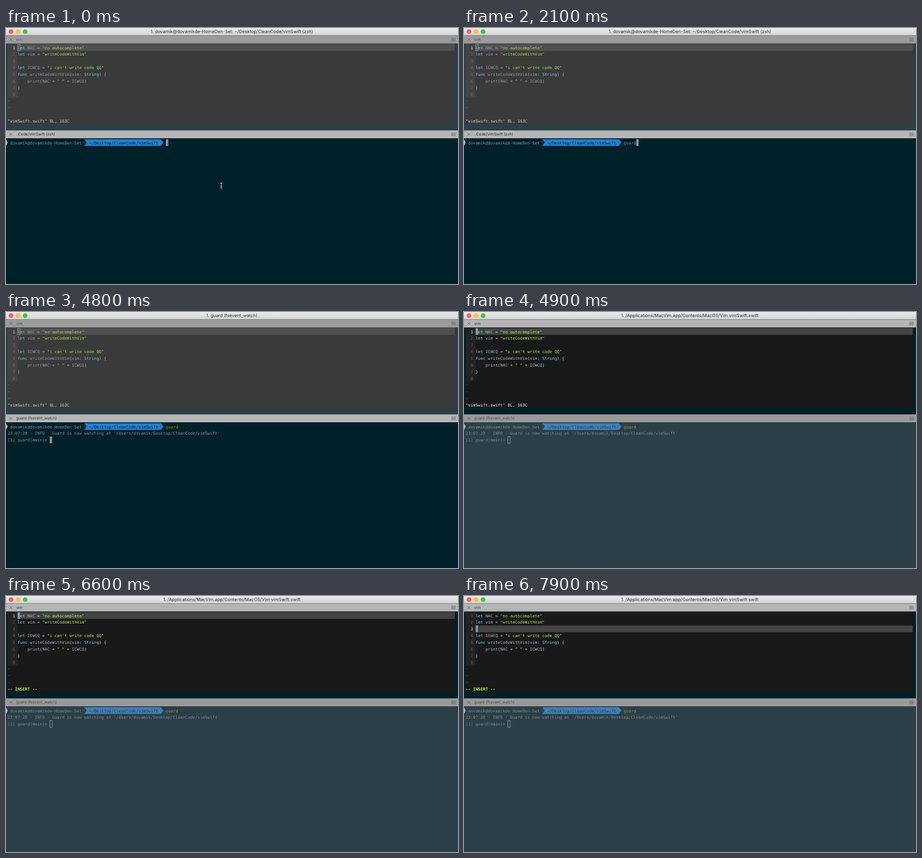
An HTML page that plays this animation: 800x455 px, repeating every 8000 ms.

```html
<!DOCTYPE html>
<html lang="en">
<head>
<meta charset="utf-8">
<title>Terminal session</title>
<style>
  html, body { margin: 0; width: 100%; height: 100%; overflow: hidden; background: #00202a; }
  svg {
    display: block; width: 800px; height: 455px;
    --shell: #00202a; --shellText: #7f9093; --guard: #859900; --blue: #2080d0; --path: #03263a; --tip: #86c9f0;
    --frame: #2c3f47; --vim: #3a3a3a; --gutter: #434343; --line: #505050; --num: #6c6c6c; --now: #d4d4d4;
    --key: #7cc4d8; --name: #9497a8; --str: #a9d85c; --plain: #b4b6b6; --tilde: #68777c; --status: #d0d0d0;
    --vimTab: #9b9b9b; --shellTab: #b5b5b5; --vimLabel: #4c4c4c; --shellLabel: #303030;
  }
  svg.editing {
    --shell: #2c3f47; --shellText: #7c8b8f; --guard: #93973a; --blue: #3f80b3; --path: #1f3f56; --tip: #8fc4e2;
    --frame: #00202a; --vim: #191919; --gutter: #232323; --line: #434343; --num: #606060; --now: #ececec;
    --key: #72dbf2; --name: #aab2c6; --str: #b2f24e; --plain: #d6d8d8; --tilde: #4d6168; --status: #f2f2f2;
    --vimTab: #b5b5b5; --shellTab: #999999; --vimLabel: #303030; --shellLabel: #4c4c4c;
  }
  text { white-space: pre; text-rendering: geometricPrecision; }
  .mono { font: 7.262px "DejaVu Sans Mono", monospace; font-variant-ligatures: none; }
  .title { font: 7.9px Inter, sans-serif; fill: #2f2f2f; text-anchor: middle; }
  .tab { font: 6.8px Inter, sans-serif; }
  .key { fill: var(--key); } .name { fill: var(--name); } .str { fill: var(--str); }
  .plain { fill: var(--plain); } .num { fill: var(--num); } .now { fill: var(--now); }
  .tilde { fill: var(--tilde); } .status { fill: var(--status); }
  .insert { fill: #b2f24e; font-weight: bold; }
  .out { fill: var(--shellText); } .path { fill: var(--path); } .guard { fill: var(--guard); }
</style>
</head>
<body>
<svg id="stage" viewBox="0 0 800 455" xmlns="http://www.w3.org/2000/svg"></svg>
<script>
const LOOP = 8000;
const COL = 4.372, ROW = 11.86, LEFT = 3;
const VIM_TOP = 28.8, SHELL_TOP = 197.7;
const USER = 'dovamik', HOST = USER + 'de-HomeDen-Set', DIR = '~/Desktop/CleanCode/vimSwift';

// When each thing happens, in ms
const KEYS = [800, 1200, 1400, 1600, 1900];
const ENTER = 2300, WATCHING = 3200, READY = 3300, EVENTS = 4100, FOCUS = 4900;
const INSERT = 6500, DOWN = [7500, 7700];

const CODE = [
  'key:let|name: NAC|plain: = |str:"no autocomplete"',
  'key:let|name: vim|plain: = |str:"writeCodeWithVim"',
  '',
  'key:let|name: ICWCQ|plain: = |str:"i can\'t write code QQ"',
  'key:func|name: writeCodeWithVim|plain:(|name:vim|plain:: |key:String|plain:) {',
  'name:    print|plain:(|name:NAC|plain: + |str:" "|plain: + |name:ICWCQ|plain:)',
  'plain:}',
  ''
];

const svg = document.getElementById('stage');
const x = col => LEFT + col * COL;
const vimY = row => VIM_TOP + row * ROW;
const shellY = row => SHELL_TOP + row * ROW;
const passed = (times, t) => times.filter(at => t >= at).length;

const rect = (left, top, w, h, fill, extra = '') =>
  `<rect x="${left}" y="${top}" width="${w}" height="${h}" style="fill:${fill}" ${extra}/>`;
const mono = (col, top, cls, body) =>
  `<text class="mono ${cls}" x="${x(col)}" y="${top + 8.8}">${body}</text>`;
const spans = line => line.split('|').map(part => {
  const cut = part.indexOf(':');
  return `<tspan class="${part.slice(0, cut)}">${part.slice(cut + 1)}</tspan>`;
}).join('');
const arrow = (left, fill) =>
  `<path d="M${left} ${SHELL_TOP}l${COL} ${ROW / 2}l${-COL} ${ROW / 2}z" style="fill:${fill}"/>`;

function cursor(col, top, filled) {
  const w = COL - 0.2, h = ROW - 0.2;
  return filled
    ? rect(x(col), top, COL, ROW, '#8b9293')
    : rect(x(col) + 0.3, top + 0.2, w, h, 'none', 'stroke="#9aa3a5" stroke-width=".8"');
}

function tabBar(top, name, label) {
  const mid = top + 7;
  const bars = [-2.2, 0, 2.2].map(d => `M788 ${mid + d}h8`).join('');
  return rect(0, top, 800, 14, `var(--${name}Tab)`) +
    `<path d="M6 ${mid - 2.4}l5 5m0 -5l-5 5${bars}" fill="none" stroke="#585858" stroke-width=".8"/>` +
    `<text class="tab" x="18" y="${mid + 2.4}" style="fill:var(--${name}Label)">${label}</text>`;
}

function titleBar(title) {
  const lights = ['#fc5b57', '#fdbc40', '#34c84a']
    .map((fill, i) => `<circle cx="${8.8 + i * 12.5}" cy="6.4" r="4.2" fill="${fill}"/>`).join('');
  return '<defs><linearGradient id="chrome" x2="0" y2="1"><stop stop-color="#ebebeb"/>' +
    '<stop offset="1" stop-color="#d3d3d3"/></linearGradient></defs>' +
    rect(0, 0, 800, 13, 'url(#chrome)') + rect(0, 12.8, 800, 0.7, '#a2a2a2') + lights +
    `<text class="title" x="399.7" y="9.3">${title}</text>`;
}

function editor(t) {
  const current = passed(DOWN, t);
  const focused = t >= FOCUS;
  const width = 181 * COL;
  let out = rect(0, 27, 800, 155, 'var(--frame)') +
    rect(LEFT, VIM_TOP - 0.5, width, 12 * ROW + 0.5, 'var(--vim)') +
    rect(LEFT, VIM_TOP - 0.5, 4 * COL, 8 * ROW + 0.5, 'var(--gutter)') +
    rect(x(4), vimY(current), width - 4 * COL, ROW, 'var(--line)') +
    cursor(4, vimY(current), focused);
  CODE.forEach((line, i) => {
    out += mono(2, vimY(i), i === current ? 'now' : 'num', i + 1);
    if (line) out += mono(4, vimY(i), '', spans(line));
  });
  for (let row = 8; row < 11; row++) out += mono(0, vimY(row), 'tilde', '~');
  return out + (t >= INSERT
    ? mono(0, vimY(11), 'insert', '-- INSERT --')
    : mono(0, vimY(11), 'status', '"vimSwift.swift" 8L, 163C'));
}

function shell(t) {
  const typed = passed(KEYS, t);
  const entered = t >= ENTER, ready = t >= READY;
  let out = rect(0, 196, 800, 259, 'var(--shell)') +
    `<path d="M0 ${SHELL_TOP}l3 ${ROW / 2}l-3 ${ROW / 2}z" style="fill:var(--tip)"/>` +
    mono(1, SHELL_TOP, 'out', `${USER}@${HOST}`) +
    rect(x(31), SHELL_TOP, 31 * COL + 0.1, ROW, 'var(--blue)') +
    arrow(x(31), 'var(--shell)') + arrow(x(62), 'var(--blue)') +
    mono(33, SHELL_TOP, 'path', DIR) +
    mono(64, SHELL_TOP, entered ? 'guard' : 'out', 'guard'.slice(0, typed));
  if (t >= WATCHING) {
    out += mono(0, shellY(1), 'out',
      `23:07:28 - INFO - Guard is now watching at '/Users/${USER}/Desktop/CleanCode/vimSwift'`);
  }
  if (ready) out += mono(0, shellY(2), 'out', '[1] guard(main)&gt;');
  const [col, row] = ready ? [17, 2] : t >= WATCHING ? [0, 2] : entered ? [0, 1] : [64 + typed, 0];
  out += cursor(col, shellY(row), t < FOCUS);
  if (!typed) {
    out += '<path d="M378.8 275q2 0 2.2 1.4q.2 -1.4 2.2 -1.4M381 276v7.5M378.8 284.6q2 0 2.2 -1.4q.2 1.4 2.2 1.4M379.8 280.8h2.4" ' +
      'fill="none" stroke="#d5dcde" stroke-width=".9"/>';
  }
  return out;
}

function render(t) {
  const job = t >= EVENTS ? 'guard (fsevent_watch)' : 'guard (ruby)';
  const title = t >= FOCUS ? '/Applications/MacVim.app/Contents/MacOS/Vim vimSwift.swift'
    : t >= ENTER ? job : `${USER}@${HOST}: ${DIR} (zsh)`;
  svg.classList.toggle('editing', t >= FOCUS);
  svg.innerHTML = titleBar('1. ' + title) + editor(t) + shell(t) +
    tabBar(13.5, 'vim', 'vim') +
    tabBar(182, 'shell', t >= ENTER ? job : '..Code/vimSwift (zsh)');
}

const start = performance.now();
let shown = -1;
function tick() {
  const step = Math.floor((performance.now() - start) % LOOP / 100);
  if (step !== shown) render((shown = step) * 100);
  requestAnimationFrame(tick);
}
tick();
</script>
</body>
</html>
```
